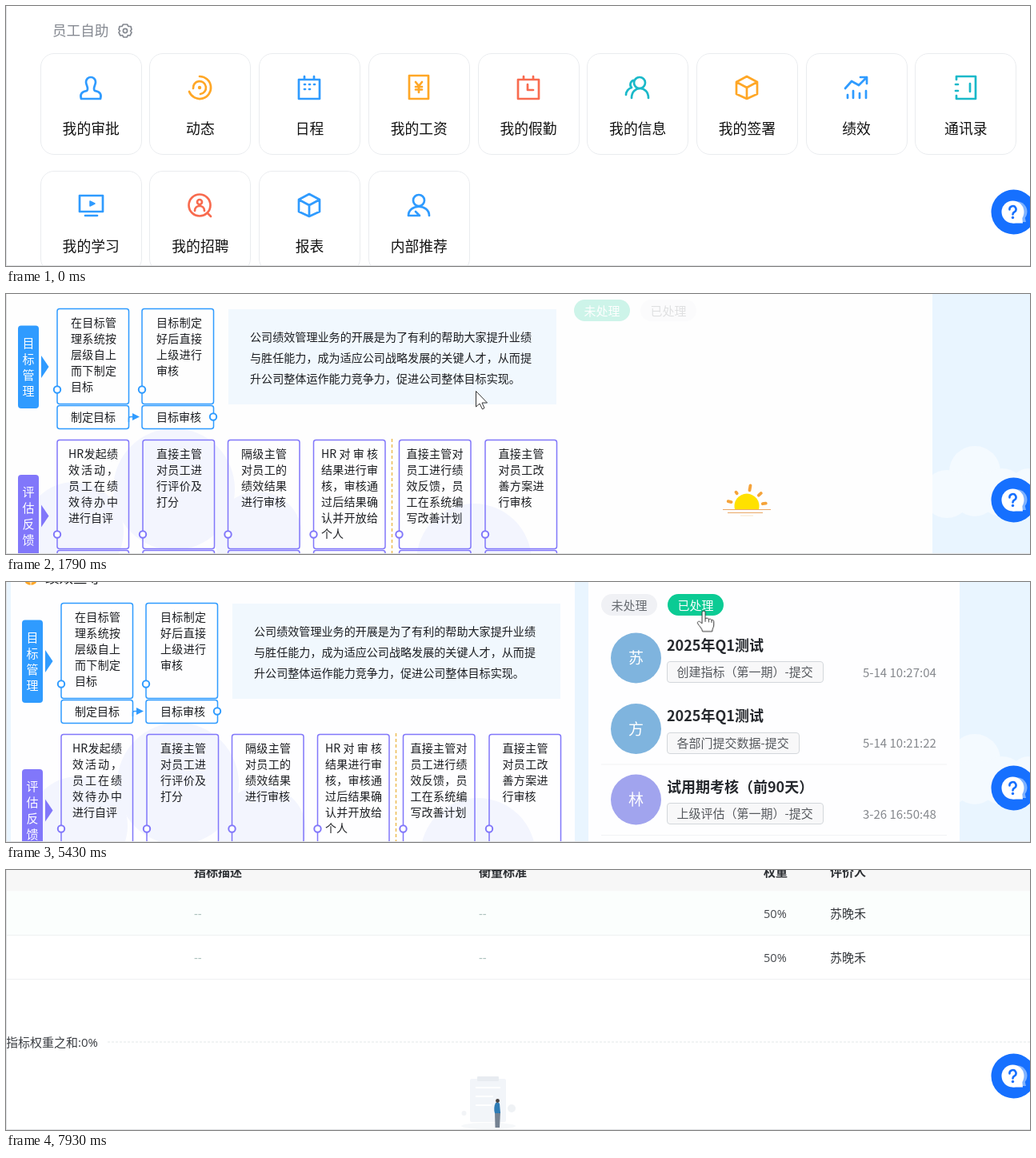
Write an HTML page that moves like this. It is 1280x325 px and loops after 8 s.

```html
<!DOCTYPE html>
<html lang="zh-CN">
<head>
<meta charset="utf-8">
<title>绩效</title>
<style>
html, body { margin: 0; width: 100%; height: 100%; overflow: hidden; background: #fff; }
#stage { position: relative; width: 1280px; height: 325px; overflow: hidden; color: #1b1d21;
  font-family: "Noto Sans CJK SC", "Noto Sans CJK", "Noto Sans", sans-serif;
  text-autospace: no-autospace; text-spacing-trim: space-all; }
#stage > div, #stage > svg, .layer, .layer > svg { position: absolute; left: 0; top: 0; width: 1280px; height: 325px; }
p { position: absolute; margin: 0; line-height: 20px; white-space: nowrap; }
p.wrap { white-space: normal; text-align: justify; }
svg { overflow: visible; }

#title { animation: fade 8s infinite; }
@keyframes fade { 0%, 18.125% { opacity: 1 } 20.5%, 100% { opacity: 0 } }
.card { position: absolute; box-sizing: border-box; width: 127px; height: 127px; border: 1px solid #eaecef;
  border-radius: 17px; background: #fff; animation: slide 8s infinite; }
.card svg { position: absolute; left: 42px; top: 22px; width: 40px; height: 40px;
  fill: none; stroke-width: 2.7; stroke-linecap: round; stroke-linejoin: round; }
.card p { left: 0; right: 0; top: 82px; text-align: center; font-size: 17.8px; color: #111; }
.card.hot { animation: slide 8s infinite, lift 8s infinite; }
.hot svg { animation: grow 8s infinite; }
@keyframes slide { 0%, 18.125% { transform: none } 20.7%, 100% { transform: translateX(var(--d)) } }
@keyframes lift { 0%, 10% { box-shadow: 0 6px 16px #0000 } 11.6%, 100% { box-shadow: 0 6px 16px #0001 } }
@keyframes grow { 0%, 10% { transform: none } 11.6%, 100% { transform: scale(1.16) } }

#flow { animation: settle 8s step-end infinite; }
#pills { animation: arrive 8s step-end infinite; }
@keyframes settle { 0% { transform: translate(-5px, -8px) } 24.125%, 100% { transform: none } }
@keyframes arrive { 0% { transform: translate(-34px, -8px); opacity: .2 } 24.125%, 100% { transform: none; opacity: 1 } }
.pill { position: absolute; top: 15px; width: 70px; height: 27px; border-radius: 14px; text-align: center;
  font-size: 15px; line-height: 27px; }
.tag { box-sizing: border-box; height: 27px; padding: 0 12px; border: 1px solid #d3d7db; border-radius: 4px;
  background: #00000006; font-size: 15px; line-height: 23px; color: #55585d; }

#sheet { animation: load 8s infinite; font-family: "Open Sans", "Noto Sans CJK SC", "Noto Sans CJK", sans-serif; }
@keyframes load { 0%, 85% { opacity: 0 } 88.25%, 100% { opacity: 1 } }
#hoverRow { animation: calm 8s infinite; }
@keyframes calm { 0%, 97% { fill: #f3fbf8 } 99.1%, 100% { fill: #fbfefd } }

#pointer { animation: move 8s ease-in-out infinite; fill: #fff; stroke: #333; stroke-linejoin: round; }
@keyframes move {
  0%, 4% { transform: translate(1227px, 236px) }
  11.625%, 21.499% { transform: translate(1070px, 132px) }
  21.5%, 24.124% { transform: translate(587px, 121px) }
  24.125%, 30.75% { transform: translate(587px, 125px) }
  36%, 41% { transform: translate(844px, 195px) }
  48.75%, 65.375% { transform: translate(853px, 26px) }
  73.25%, 96.5% { transform: translate(943px, 72px) }
  99%, 100% { transform: translate(935px, -32px) }
}
</style>
</head>
<body>
<div id="stage"></div>
<script>
const BLUE = '#2f9bff', ORANGE = '#ffa726', RED = '#f86b4f', TEAL = '#1ab9c9', PURPLE = '#8177fa', GREEN = '#0bcb94';
const SKY = '#e9f5ff';
const rules = [];

// Switches a selector's opacity at the given times: [[ms, 0 or 1], ...].
function toggle(sel, changes) {
  const name = 'toggle' + rules.length;
  rules.push(`${sel}{animation:${name} 8s step-end infinite}
    @keyframes ${name}{${changes.map(([ms, on]) => `${ms / 80}%{opacity:${on}}`).join('')}}`);
}
const show = (sel, from, to) => toggle(sel, [[0, 0], [from, 1], [to, 0]]);
const text = (x, mid, size, s, css = '') =>
  `<p style="left:${x}px;top:${mid - 11}px;font-size:${size}px;${css}">${s}</p>`;
const block = (x, mid, width, s) =>
  `<p class="wrap" style="left:${x}px;top:${mid - 11}px;width:${width}px;font-size:14px">${s}</p>`;
const layer = (id, html) => `<div class="layer" id="${id}">${html}</div>`;
const svg = body => `<svg viewBox="0 0 1280 325">${body}</svg>`;
const box = (x, y, w, h, fill, more = '') => `<rect x="${x}" y="${y}" width="${w}" height="${h}" fill="${fill}" ${more}/>`;
const dot = (x, y, r, fill, more = '') => `<circle cx="${x}" cy="${y}" r="${r}" fill="${fill}" ${more}/>`;
const path = (d, fill = 'none', more = '') => `<path d="${d}" fill="${fill}" ${more}/>`;

// ---- home: cards ----
const cube = path('M0-14L13-7V8L0 14L-13 8V-7ZM-13-7L0 0L13-7M0 0V14');
const calendar = 'M-13-10H13V14H-13ZM-6-14V-10M6-14V-10';
const rows = [[
  ['我的审批', BLUE, path('M-12 14C-14 8-11 5-5 4C-2 1-6-3-6-7A6 6 0 0 1 6-7C6-3 2 1 5 4C11 5 14 8 12 14Z')],
  ['动态', ORANGE, path('M0-14A14 14 0 1 1-13 5M-8 1A8 8 0 1 1 1 8') + dot(0, 0, 2.2, ORANGE, 'stroke="none"')],
  ['日程', BLUE, path(calendar + 'M-6-4h1M0-4h1M6-4h1M-6 2h1M0 2h1')],
  ['我的工资', ORANGE, path('M-12-15H12V14H-12ZM-4-7L0-2L4-7M0-2V6M-4-1H4M-4 2.500H4')],
  ['我的假勤', RED, path(calendar + 'M-1-4V3H6')],
  ['我的信息', TEAL, path('M-7 13C-7-3 14-3 14 13M-5-9A5.500 5.500 0 0 0-7 0C-11 1-14 5-14 9') + dot(3, -6, 7, 'none')],
  ['我的签署', ORANGE, cube],
  ['绩效', BLUE, path('M-14 1L-6-8L3-3L13-13M5-13H13V-5M-11 9V13M-4 4V13M4 7V13M12 4V13')],
  ['通讯录', TEAL, path('M-11-10V-14H13V14H-11V10M-12-4h3M-12 4h3M6-5V5')]
], [
  ['我的学习', BLUE, path('M-14-12H15V8H-14ZM-7 13H8') + path('M-1-5L5-2L-1 1Z', BLUE, 'stroke-width="1.5"')],
  ['我的招聘', RED, dot(0, 0, 13.5, 'none') + dot(0, -4, 3, 'none') + path('M-6 7C-6-1 6-1 6 7M10 10L14 14')],
  ['报表', BLUE, cube],
  ['内部推荐', BLUE, dot(0, -6, 7, 'none') + path('M-4 8L1 13H-13C-13-2 13-2 13 13')]
]];
const card = ([label, color, icon], col, row) =>
  `<div class="card${label === '绩效' ? ' hot' : ''}" style="left:${42.7 + 136.7 * col}px;top:${59 + 147 * row}px;--d:${-188.5 + 20.85 * col}px">
    <svg viewBox="-20 -20 40 40" stroke="${color}">${icon}</svg><p>${label}</p></div>`;
const gear = svg(`<g transform="translate(149 31)" stroke="#858991" stroke-width="1.7" stroke-linejoin="round">
  ${path('M-2.500-8H2.500L4-5.500L7-5.500L8-1.500L6.500 0L8 2L6 6L3.500 5.500L2 8H-2L-3.500 5.500L-6 6L-8 2L-6.500 0L-8-1.500L-7-5.500L-4-5.500Z')}${dot(0, 0, 2.6, 'none')}</g>`);
const home = layer('home',
  layer('title', text(58, 31, 17.6, '员工自助', 'color:#858991') + gear) +
  rows.map((list, row) => list.map((item, col) => card(item, col, row)).join('')).join(''));
show('#home', 0, 1720);

// ---- performance page: left flow chart ----
const ring = (x, y, color) => dot(x, y, 4.2, '#fff', `stroke="${color}" stroke-width="2"`);
const outline = (x, y, h, color) => box(x, y, 89.5, h, 'none', `rx="3" stroke="${color}" stroke-width="1.5"`);
const sideTag = (y, color) =>
  box(20, y, 26, 103.5, color, 'rx="4"') + path(`M49 ${y + 37.5}L58.500 ${y + 51.5}L49 ${y + 65.5}Z`, color);
const sideText = (mid, label) => [...label].map((c, i) => text(25.5, mid + 20 * i, 15, c, 'color:#fff')).join('');
const reviews = [
  [69, 83, 62, 'HR发起绩效活动，员工在绩效待办中进行自评'],
  [176, 193, 57, '直接主管对员工进行评价及打分'],
  [282.5, 299, 57, '隔级主管对员工的绩效结果进行审核'],
  [389.5, 399, 71, 'HR对审核结果进行审核，审核通过后结果确认并开放给个人'],
  [496.5, 505.5, 71, '直接主管对员工进行绩效反馈，员工在系统编写改善计划'],
  [604, 620.5, 57, '直接主管对员工改善方案进行审核']
];
const goals = [[69, 86, '在目标管理系统按层级自上而下制定目标', '制定目标'], [175, 193, '目标制定好后直接上级进行审核', '目标审核']];
const hills = [[215, 252, 76], [90, 305, 62], [320, 310, 55], [590, 342, 72]];
const flow = layer('flow', svg(
  hills.map(h => dot(...h, '#f3f5fe')).join('') +
  dot(31, -5, 9, ORANGE) + path('M24-2Q31 2 38-2M31-8V4', 'none', 'stroke="#fff"') +
  sideTag(47.5, BLUE) + sideTag(234, PURPLE) + box(283, 27, 410, 119, '#f1f8fe') +
  goals.map(([x]) => outline(x, 26.5, 119, BLUE) + outline(x, 147.5, 29, BLUE) + ring(x, 127.5, BLUE)).join('') +
  ring(264, 161.5, BLUE) + path('M158.500 168V163Q158.500 161.500 161 161.500H164', 'none', `stroke="${BLUE}" stroke-width="1.5"`) +
  path('M163 157L172 161.500L163 166Z', BLUE) +
  reviews.map(([x]) => outline(x, 190.5, 136, PURPLE) + outline(x, 328.5, 30, PURPLE) + ring(x, 308.5, PURPLE)).join('') +
  path('M487.500 189V340', 'none', 'stroke="#edbd55" stroke-width="1.5" stroke-dasharray="4 3"')) +
  text(49, -5, 17.5, '绩效宣导', 'font-weight:500') + sideText(70, '目标管理') + sideText(256, '评估反馈') +
  goals.map(([, x, s, name]) => block(x, 44, 57, s) + text(x, 161.5, 14, name)).join('') +
  ['公司绩效管理业务的开展是为了有利的帮助大家提升业绩', '与胜任能力，成为适应公司战略发展的关键人才，从而提',
    '升公司整体运作能力竞争力，促进公司整体目标实现。'].map((s, i) => text(310, 61.5 + 26 * i, 14.08, s)).join('') +
  reviews.map(([, x, w, s]) => block(x, 208, w, s)).join(''));

// ---- performance page: right side ----
const pill = (x, label, bg, color, id = '') =>
  `<div ${id && `id="${id}"`} class="pill" style="left:${x}px;background:${bg};color:${color};${color === '#fff' ? 'font-weight:500' : ''}"><span style="position:relative;top:-.5px">${label}</span></div>`;
const pills = layer('pills',
  layer('todo', pill(744, '未处理', GREEN, '#fff') + pill(827, '已处理', '#f0f1f5', '#666a70') + pill(827, '已处理', '#55d8b5', '#fff', 'pillHover')) +
  layer('done', pill(744, '未处理', '#f0f1f5', '#666a70') + pill(827, '已处理', GREEN, '#fff')));
show('#todo', 0, 4630);
show('#done', 4630, 8000);
show('#pillHover', 3830, 4630);

const empty = layer('empty', svg(
  `<linearGradient id="mint" x2="0" y2="1"><stop stop-color="#6fdcc4"/><stop offset="1" stop-color="#93ebd7"/></linearGradient>
  <ellipse cx="958" cy="293" rx="36" ry="3.500" fill="#dcf2f1"/>` +
  path('M907 204L1001 203L988 240H909Z', '#5fd0b8') +
  `<g transform="translate(974 185) rotate(28)">${box(-18, -26, 36, 52, '#5cb8fa', 'rx="2"') + box(-14, -21, 28, 40, '#a0daff') + path('M-14 19V8L-6 0L2 9L7 4L14 10V19Z', '#76c8fc') + dot(5, -11, 4, '#d8f0ff')}</g>` +
  path('M909 224H988V279H909Z', 'url(#mint)') + path('M988 232L1005 224V264L988 279Z', '#62d3bb') +
  path('M907 203L899 229L905 235L915 222Z', '#b3f3e4') + path('M909 222H986L988 240H900Z', '#a6f0e0') +
  path('M1002 203L1017 229L1002 243L988 238Z', '#a6f0e0') +
  `<g transform="translate(922 157) rotate(22)"><ellipse rx="22" ry="9.500" fill="#ffb95a"/><path d="M-12-1C-11-17 11-17 12-1Q0 5-12-1Z" fill="#ffcb80"/></g>` +
  box(900, 178, 9, 20, '#f9a08d', 'transform="rotate(-40 904 188)"') + box(1019, 183, 8, 16, '#b184ec', 'transform="rotate(18 1023 191)"') +
  dot(947, 149, 2, BLUE) + dot(1008, 167, 1.6, '#f9a08d') + dot(899, 205, 2.3, '#ffc163')) +
  text(863, 322, 17.5, '没有需要处理的绩效哦～', 'color:#62dcc2'));
show('#empty', 1930, 4630);

const entries = [
  ['苏', '#7fb4de', '2025年Q1测试', '创建指标（第一期）-提交', '5-14 10:27:04'],
  ['方', '#7fb4de', '2025年Q1测试', '各部门提交数据-提交', '5-14 10:21:22'],
  ['林', '#a1a4ee', '试用期考核（前90天）', '上级评估（第一期）-提交', '3-26 16:50:48']
];
const list = layer('list', svg(
  box(744, 51, 432, 88.5, '#e5effd', 'rx="5" id="rowHover"') + path('M744 228H1176M744 316.500H1176', 'none', 'stroke="#f1f2f4"') +
  entries.map((e, i) => dot(787.5, 95 + 88.5 * i, 31.5, e[1])).join('')) +
  entries.map(([initial, , name, tag, time], i) => {
    const y = 88.5 * i;
    return text(778, y + 95, 19, initial, 'color:#fff;font-weight:500') + text(826, y + 78.5, 18, name, 'font-weight:700;color:#25282d') +
      `<p class="tag" style="left:825.5px;top:${y + 99}px">${tag}</p>` +
      text(1071, y + 113.5, 15, time, 'color:#85888d');
  }).join(''));
show('#list', 4630, 8000);
show('#rowHover', 5520, 8000);

const ray = (angle, len) => `<path d="M0-20V${-20 - len}" transform="rotate(${angle})"/>`;
const sun = `<g transform="translate(926 265)">${path('M-15 4A15.500 15.500 0 1 1 15 4Z', '#ffe100')}
  <g stroke="#f5a33a" stroke-width="3.800" stroke-linecap="round">${ray(-76, 4) + ray(-38, 2) + ray(10, 6) + ray(48, 4) + ray(82, 4)}</g>
  ${path('M-30 4.500H30M-24 8.500H20', 'none', 'stroke="#eaa765" stroke-width="1.200"')}${path('M-8 12H8', 'none', 'stroke="#f9e6c8"')}</g>`;
const cloud = [[1211, 222, 32], [1176, 250, 30], [1245, 248, 30], [1211, 250, 28], [1278, 240, 22]].map(c => dot(...c, '#f4faff')).join('');
const page = layer('page',
  svg(box(0, 0, 1280, 325, SKY) + cloud + box(6, 0, 705, 325, '#fefeff') + box(728, 0, 464, 325, '#fefeff') +
    `<g id="loading">${box(0, 0, 1280, 325, SKY) + cloud + box(0, 0, 1158, 325, '#fefefe') + sun}</g>`) + flow + empty + list + pills);
show('#page', 1720, 6590);
show('#loading', 1720, 1930);

// ---- detail table ----
const head = (x, s) => text(x, 3, 15, s, 'font-weight:700;color:#2c2f33');
const tableRow = y => text(235, y, 15, '--', 'color:#a9bfba') + text(591, y, 15, '--', 'color:#a9bfba') +
  text(947, y, 14.6, '50%', 'color:#44474c') + text(1030, y, 15, '苏晚禾', 'color:#33363a');
const sheet = layer('sheet', svg(
  box(0, 0, 1280, 26.5, '#f7f7f7') + box(0, 26.5, 1280, 55, '#fbfefd', 'id="hoverRow"') +
  path('M0 81.500H1280M0 136.500H1280', 'none', 'stroke="#eff1f2"') +
  path('M127 215H1280', 'none', 'stroke="#e3e7e8" stroke-dasharray="3 2"') +
  `<ellipse cx="603" cy="320" rx="34" ry="4" fill="#f6f8fa"/>` + box(580, 261, 45, 54, '#f2f5f9', 'rx="2"') + box(589, 258, 27, 6, '#e8ecf1', 'rx="1"') +
  path('M587 272H618M587 283H609M587 294H607', 'none', 'stroke="#fff" stroke-width="2"') +
  dot(632, 298, 5, '#eff2f5') + dot(572.5, 304, 3, '#f2f4f7') +
  path('M611 302H618L617 322H611.500Z', '#748292') + path('M612 291Q615 289 617 292L618 304H611Q609 297 612 291Z', '#2f7cb5') +
  dot(614.5, 288.5, 2.4, '#4a4544')) +
  head(235, '指标描述') + head(591, '衡量标准') + head(947, '权重') + head(1030, '评价人') +
  tableRow(55) + tableRow(110) + text(0, 216, 15, '指标权重之和:0%', 'color:#3a3d42'));
show('#detail', 6590, 8000);

// ---- always on top: frame, help button, clicks, pointer ----
const help = dot(1259.5, 257.5, 28, '#1670ff') + dot(1264, 257, 12.5, '#7fb2ff') + path('M1264 270H1275L1273 262Z', '#7fb2ff') +
  dot(1258.5, 257.5, 14, '#fff') + path('M1258 271.500H1271L1270 262Z', '#fff') +
  path('M1254.500 254.500A4 4 0 1 1 1260.500 257.500Q1258.500 258.500 1258.500 260.500', 'none', 'stroke="#1670ff" stroke-width="2.600" stroke-linecap="round"') + dot(1258.5, 264.5, 1.7, '#1670ff');
const clicks = [[1070, 132, 1260, 1450], [853, 25, 4360, 4630], [943, 72, 6240, 6440]];
clicks.forEach(([, , from, to], i) => show('#click' + i, from, to));
const pointer = `<g id="pointer">
  <path id="arrow" d="M.5 .5V20L5 16L8.500 23L11 21.500L8 15H14.500Z"/>
  <g id="hand"><path d="M-2 2.200a2 2 0 0 1 4 0V10c1-1 4-1 4.300.8 1-.8 3.300-.4 3.600 1 1.300-.6 2.800.2 2.800 1.800V18c0 3-2 4-2 8H-1.500C-2 22-5 20-7.500 16c-1-2 1.500-3.500 3-2L-2 16Z"/>
  <path d="M2 10V14M6.300 11V14.500M9.900 12V15"/></g></g>`;
toggle('#arrow', [[0, 0], [320, 1], [640, 0], [1720, 1], [3830, 0], [6590, 1]]);
toggle('#hand', [[0, 0], [640, 1], [1720, 0], [3830, 1], [6590, 0]]);

const overlay = svg(path('M.5 0V325M0 324.500H1280', 'none', 'stroke="#dfe0e2"') + help +
  clicks.map(([x, y], i) => dot(x, y, 15, '#ffee20', `fill-opacity=".75" id="click${i}"`)).join('') + pointer);

document.getElementById('stage').innerHTML = home + page + layer('detail', sheet) + overlay;
document.head.appendChild(document.createElement('style')).textContent = rules.join('\n');
</script>
</body>
</html>
```
